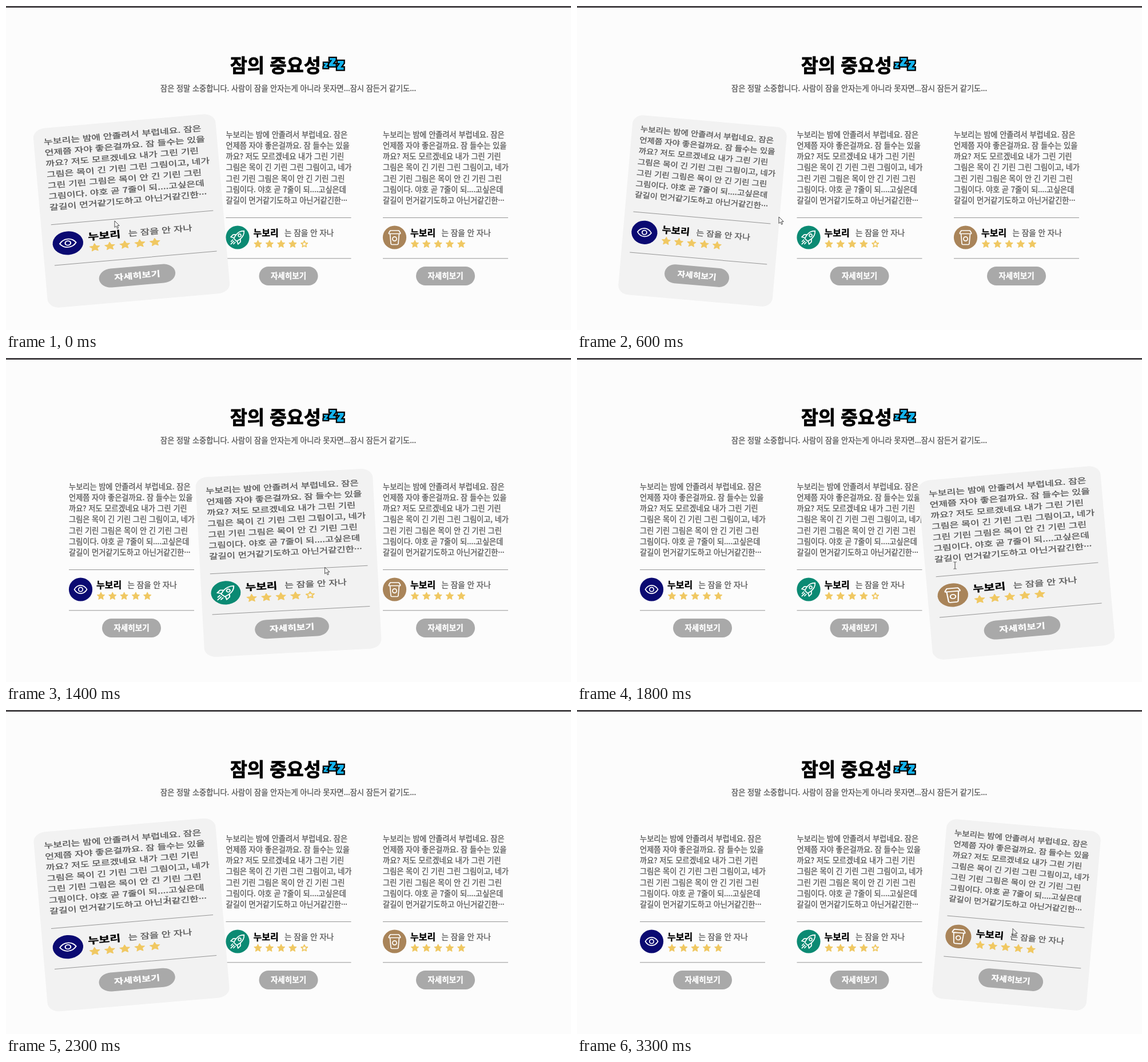
Animation, 988 px wide and 567 px high, one loop 3400 ms. Source, as an HTML page:

```html
<!DOCTYPE html>
<html lang="ko">
<head>
<meta charset="utf-8">
<style>
  html, body { margin: 0; width: 100%; height: 100%; overflow: hidden; background: #fcfcfc; }
  svg { display: block; }
  text { font-family: "Noto Sans CJK KR", "Noto Sans CJK", "Noto Sans CJK JP", sans-serif; font-size: 13.2px; font-weight: 500; fill: #565656; stroke: #565656; stroke-width: .3; }
  .title { font-size: 32.5px; font-weight: 900; fill: #000; stroke: #000; stroke-width: .8; }
  .name { font-size: 16px; font-weight: 900; fill: #000; stroke: #000; }
  .note { font-size: 13.55px; }
  .more { font-size: 13.5px; font-weight: 700; fill: #fff; stroke: #fff; text-anchor: middle; }
  .back { fill: #f2f2f2; visibility: hidden; }
  .on .back { visibility: visible; }
  .rule { stroke: #959595; }
  .star { fill: #f0c862; stroke: #f0c862; stroke-linejoin: round; }
  .empty { fill: none; stroke-width: 1.8; }
  .icon { fill: none; stroke: #fff; stroke-width: 1.7; stroke-linejoin: round; stroke-linecap: round; }
  .zzz path { stroke: #000; stroke-width: 4.6; fill: #14b4ee; paint-order: stroke; }
</style>
</head>
<body>
<svg id="stage" width="988" height="567" viewBox="0 0 988 567">
  <rect width="988" height="567" fill="#fcfcfc"/>
  <rect width="988" height="3" fill="#484548"/>
  <text class="title" x="392" y="116">잠의 중요성</text>
  <g class="zzz" transform="translate(0 -.5)">
    <path d="M556 100h7v2.500l-3.500 4h3.500v2.500h-7.500v-2.500l3.500-4h-3z"/>
    <path d="M580 96.500h10.500v4l-5.500 7.500h5.500v4h-11.500v-4l5.500-7.500h-4.500z"/>
    <path d="M566 91.500h10.500v3.500l-5.500 7h5.500v4h-11.500v-4l5.500-7h-4.500z"/>
  </g>
  <text x="270" y="149">잠은 정말 소중합니다. 사람이 잠을 안자는게 아니라 못자면...잠시 잠든거 같기도...</text>
  <g id="cards"></g>
  <path id="arrow" d="M0 0v11.500l2.700-2.500 1.900 4.300 1.900-.8-1.900-4.200h3.600z" fill="#fff" stroke="#333" stroke-width=".9"/>
  <path id="beam" d="M-2.500-6h2l.5.500.500-.500h2M0-5.500v11M-2.500 6h2l.500-.500.500.500h2" fill="none" stroke="#444"/>
</svg>
<script>
const LOOP = 3400, STEP = 100, SWING = 200;
const MID_X = [219.5, 494, 768.5], MID_Y = 358.5;

const LINES = [
  '누보리는 밤에 안졸려서 부럽네요. 잠은',
  '언제쯤 자야 좋은걸까요. 잠 들수는 있을',
  '까요? 저도 모르겠네요 내가 그린 기린',
  '그림은 목이 긴 기린 그린 그림이고, 네가',
  '그린 기린 그림은 목이 안 긴 기린 그린',
  '그림이다. 야호 곧 7줄이 되....고싶은데',
  '갈길이 먼거같기도하고 아닌거같긴한···'
];

// Icons are drawn around the centre of their disc.
const KINDS = [
  { color: '#0b0a72', stars: 5, icon: '<path d="M-11 0C-5.500-9.500 5.500-9.500 11 0C5.500 9.500-5.500 9.500-11 0z"/><circle r="3.700"/>' },
  { color: '#0b8a73', stars: 4, icon: '<g transform="rotate(45)"><path d="M0-16Q6.500-10 5 0L3.500 6h-7L-5 0Q-6.500-10 0-16zM-5-2l-4 4v6l5-3M5-2l4 4v6l-5-3M-3 9v4M0 9.500v7M3 9v4"/><circle cy="-5" r="2.500"/></g>' },
  { color: '#a98459', stars: 5, icon: '<path d="M-10-6.500h20v-1.500l-2.500-4h-15l-2.500 4zM-8-6.500l1.500 17q.2 2 2 2h9q1.800 0 2-2l1.500-17"/><circle cy="2.500" r="3.600"/>' }
];

function starPath(x, y, r) {
  const pts = Array.from({ length: 10 }, (_, i) => {
    const a = Math.PI * (i / 5 - 0.5), d = i % 2 ? r * 0.48 : r;
    return (x + d * Math.cos(a)).toFixed(2) + ' ' + (y + d * Math.sin(a)).toFixed(2);
  });
  return 'M' + pts.join('L') + 'z';
}

// Card contents are placed relative to the card centre.
function cardMarkup({ color, stars, icon }) {
  const body = LINES.map((s, i) => `<text x="-109.500" y="${(-128.7 + 19.2 * i).toFixed(1)}">${s}</text>`).join('');
  const rating = Array.from({ length: 5 }, (_, i) => i < stars
    ? `<path class="star" d="${starPath(-53.5 + 20.3 * i, 58.3, 7)}"/>`
    : `<path class="star empty" d="${starPath(-53.5 + 20.3 * i, 58.3, 5.8)}"/>`).join('');
  return `<g>
    <rect class="back" x="-123" y="-157.5" width="246" height="315" rx="16"/>
    ${body}
    <path class="rule" d="M-109.500 12h219M-109.500 83.300h219"/>
    <circle cx="-89" cy="46.500" r="20.600" fill="${color}"/>
    <g class="icon" transform="translate(-89 46.500)">${icon}</g>
    <text class="name" x="-61.500" y="44.500">누보리</text>
    <text class="note" x="-7" y="43.800">는 잠을 안 자나</text>
    ${rating}
    <rect x="-51.500" y="97.500" width="103" height="33" rx="16.500" fill="#a9a9a9"/>
    <text class="more" y="118.500">자세히보기</text>
  </g>`;
}

// Hover spans: card, from, to, time of a widest pose.
const HOVERS = [
  [0, 0, 650, 0], [1, 680, 1560, 1100], [2, 1600, 1880, 1800], [1, 1900, 2130, 2000],
  [0, 2150, 2450, 2330], [1, 2480, 2980, 2830], [2, 3020, 3400, 3100]
];

// Pointer path: time, x, y.
const TRACK = [
  [0, 190, 376], [600, 353, 369], [1100, 480, 368.5], [1800, 661, 363],
  [2300, 281, 332], [2800, 531, 353], [3300, 762, 382.5], [3400, 800, 386]
];

const holder = document.getElementById('cards');
holder.innerHTML = KINDS.map(cardMarkup).join('');
const cards = [...holder.children];
const arrow = document.getElementById('arrow'), beam = document.getElementById('beam');

// The CSS "ease" curve.
function ease(x) {
  const curve = (s, a, b) => 3 * a * s * (1 - s) ** 2 + 3 * b * s * s * (1 - s) + s ** 3;
  let lo = 0, hi = 1;
  for (let i = 0; i < 24; i++) {
    const m = (lo + hi) / 2;
    if (curve(m, 0.25, 0.25) < x) lo = m; else hi = m;
  }
  return curve(lo, 0.1, 1);
}

function swing(t, peak) {
  const u = (((t - peak) / SWING) % 2 + 2) % 2;
  const k = u < 1 ? 1 - ease(u) : ease(u - 1);
  return ` rotate(${5 - 10 * k}) scale(${1.1 + 0.2 * k} 1)`;
}

function pointerAt(t) {
  const i = TRACK.findIndex(p => p[0] > t);
  const [t0, x0, y0] = TRACK[i - 1], [t1, x1, y1] = TRACK[i];
  const f = (t - t0) / (t1 - t0);
  return [x0 + (x1 - x0) * f, y0 + (y1 - y0) * f];
}

function draw(t) {
  const hover = HOVERS.find(h => t >= h[1] && t < h[2]);
  cards.forEach((card, i) => {
    const on = !!hover && hover[0] === i;
    card.setAttribute('class', on ? 'on' : '');
    card.setAttribute('transform', `translate(${MID_X[i]} ${MID_Y})` + (on ? swing(t, hover[3]) : ''));
    if (on && holder.lastChild !== card) holder.append(card);
  });
  const overText = t >= 1700 && t < 3000;
  const [x, y] = pointerAt(t);
  for (const [el, shown] of [[arrow, !overText], [beam, overText]]) {
    el.setAttribute('visibility', shown ? 'visible' : 'hidden');
    el.setAttribute('transform', `translate(${x} ${y})`);
  }
}

const start = performance.now();
function tick() {
  const t = (performance.now() - start) % LOOP;
  draw(Math.floor(t / STEP) * STEP);
  requestAnimationFrame(tick);
}
tick();
</script>
</body>
</html>
```
